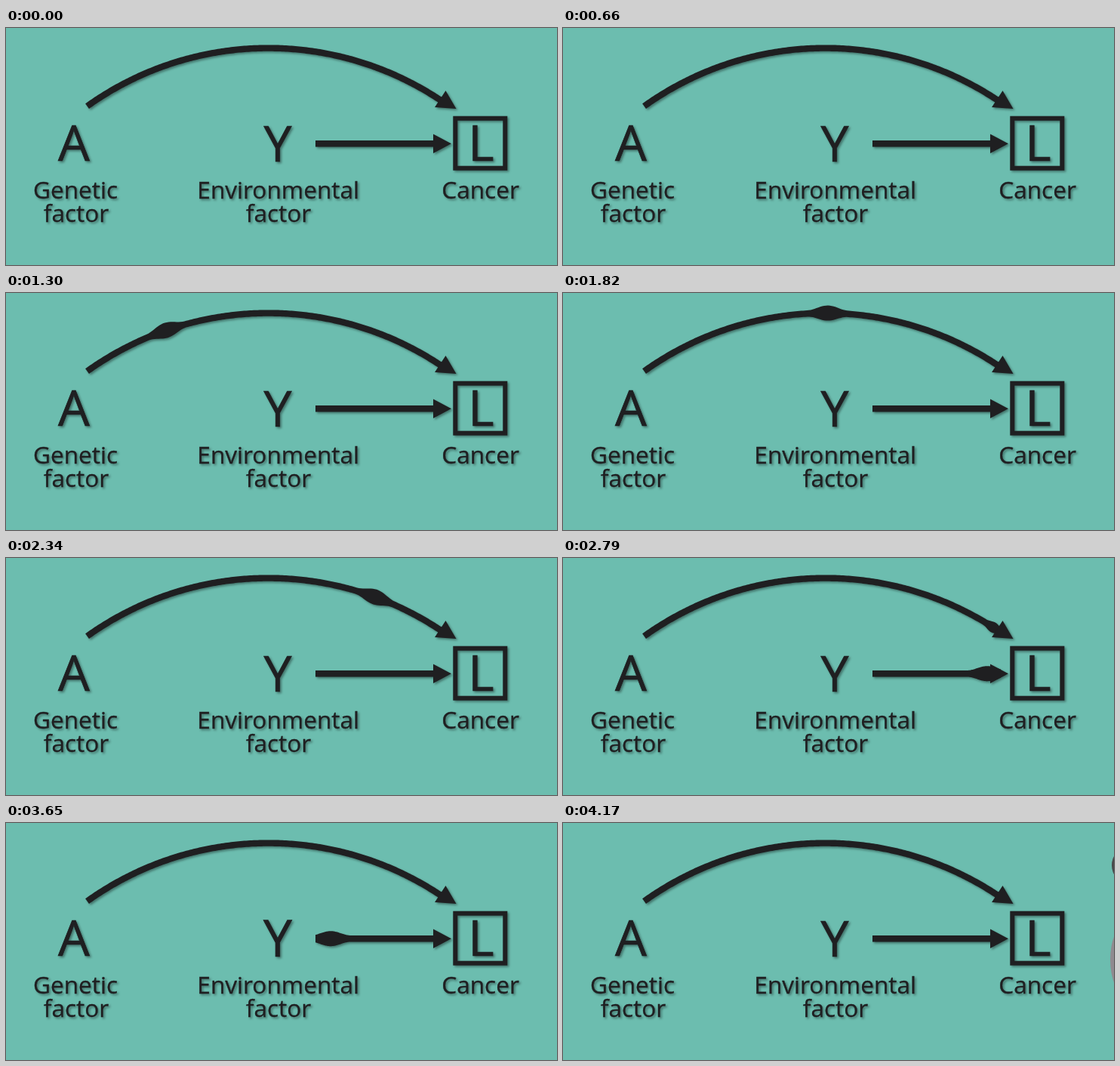
Animation of 730x314 px, one loop 4240 ms. Source, as an HTML page:

```html
<!DOCTYPE html>
<html lang="en">
<head>
<meta charset="utf-8">
<title>Causal diagram</title>
<style>
  html, body { margin: 0; width: 100%; height: 100%; overflow: hidden; background: #6cbdaf; }
  svg { display: block; width: 730px; height: 314px; }
  text {
    font-family: "Open Sans", "Noto Sans", sans-serif; font-size: 31.6px; text-anchor: middle;
    stroke: #1f1f21; stroke-width: .35px;
  }
  .node text { font-size: 66px; stroke-width: .7px; }
  #diagram { fill: #1f1f21; filter: drop-shadow(2px 2px 1.5px rgba(0, 0, 0, .38)); }
</style>
</head>
<body>
<svg viewBox="0 0 730 314">
  <g id="diagram">
    <path id="arc"/>
    <path d="M596.5 107L582.5 83L568 105Z"/>
    <path id="line"/>
    <path d="M590 153.3L566 140.5V166Z"/>
    <g id="a" class="node"><text x="90" y="176.300">A</text></g>
    <g id="y" class="node"><text x="360" y="176.500">Y</text></g>
    <g id="l" class="node">
      <rect x="595.3" y="119.700" width="66" height="66" fill="none" stroke="#1f1f21" stroke-width="6"/>
      <text x="629.5" y="176.300">L</text>
    </g>
    <text x="92" y="226">Genetic</text>
    <text x="93" y="257.300">factor</text>
    <text x="360.700" y="226">Environmental</text>
    <text x="361" y="257.300">factor</text>
    <text x="628.500" y="226">Cancer</text>
  </g>
  <g id="visitor">
    <ellipse cx="753" cy="56" rx="20" ry="23" fill="#48494b"/>
    <ellipse cx="751" cy="181" rx="20" ry="46" fill="#8f8b90"/>
  </g>
</svg>
<script>
const LOOP = 4240, RADIUS = 412, CX = 347.4, CY = 438.6, LINE_Y = 153.2;
const el = id => document.getElementById(id);
const clamp = u => Math.max(0, Math.min(1, u));
const ramp = (t, from, to) => clamp((t - from) / (to - from));
const mix = (a, b, u) => a + (b - a) * u;

// Points on a curve at distance s, pushed sideways by w.
const onArc = (s, w) => {
  const angle = s / RADIUS, r = RADIUS + w;
  return [CX + r * Math.sin(angle), CY - r * Math.cos(angle)];
};
const onLine = (s, w) => [s, LINE_Y - w];

// A band of even width with one smooth swelling centred on `at`; size runs from 0 to 1.
function band(point, from, to, at, size) {
  const upper = [], lower = [], steps = 200;
  for (let i = 0; i <= steps; i++) {
    const s = mix(from, to, i / steps);
    const near = clamp(Math.abs(s - at) / (27 * size + 0.01));
    const w = 4.2 + 5.8 * size * Math.cos(near * Math.PI / 2) ** 2;
    upper.push(point(s, w).map(v => v.toFixed(2)));
    lower.unshift(point(s, -w).map(v => v.toFixed(2)));
  }
  return "M" + upper.concat(lower).join("L") + "Z";
}

function pulse(id, x, t, from, to) {
  const k = 1 + 0.2 * Math.sin(Math.PI * ramp(t, from, to));
  el(id).setAttribute("transform", `translate(${x} 170) scale(${k}) translate(${-x} -170)`);
}

function draw(now) {
  const t = now % LOOP;
  const arcAt = mix(-256, 235, ramp(t, 864, 2676));
  const arcSize = ramp(t, 850, 980) * (1 - ramp(t, 2690, 2880));
  el("arc").setAttribute("d", band(onArc, -256, 243, arcAt, arcSize));

  const lineAt = mix(577, 412, ramp(t, 2692, 3769));
  const lineSize = ramp(t, 2680, 2780) * (1 - ramp(t, 3720, 3860));
  el("line").setAttribute("d", band(onLine, 410, 580, lineAt, lineSize));

  pulse("a", 90, t, 680, 1200);
  pulse("l", 628.3, t, 2790, 3310);
  pulse("y", 360, t, 3640, 3920);

  el("visitor").setAttribute("transform", `translate(${-6 * ramp(t, 4080, 4170)} 0)`);
  requestAnimationFrame(() => draw(performance.now() - start));
}
const start = performance.now();
draw(0);
</script>
</body>
</html>
```
